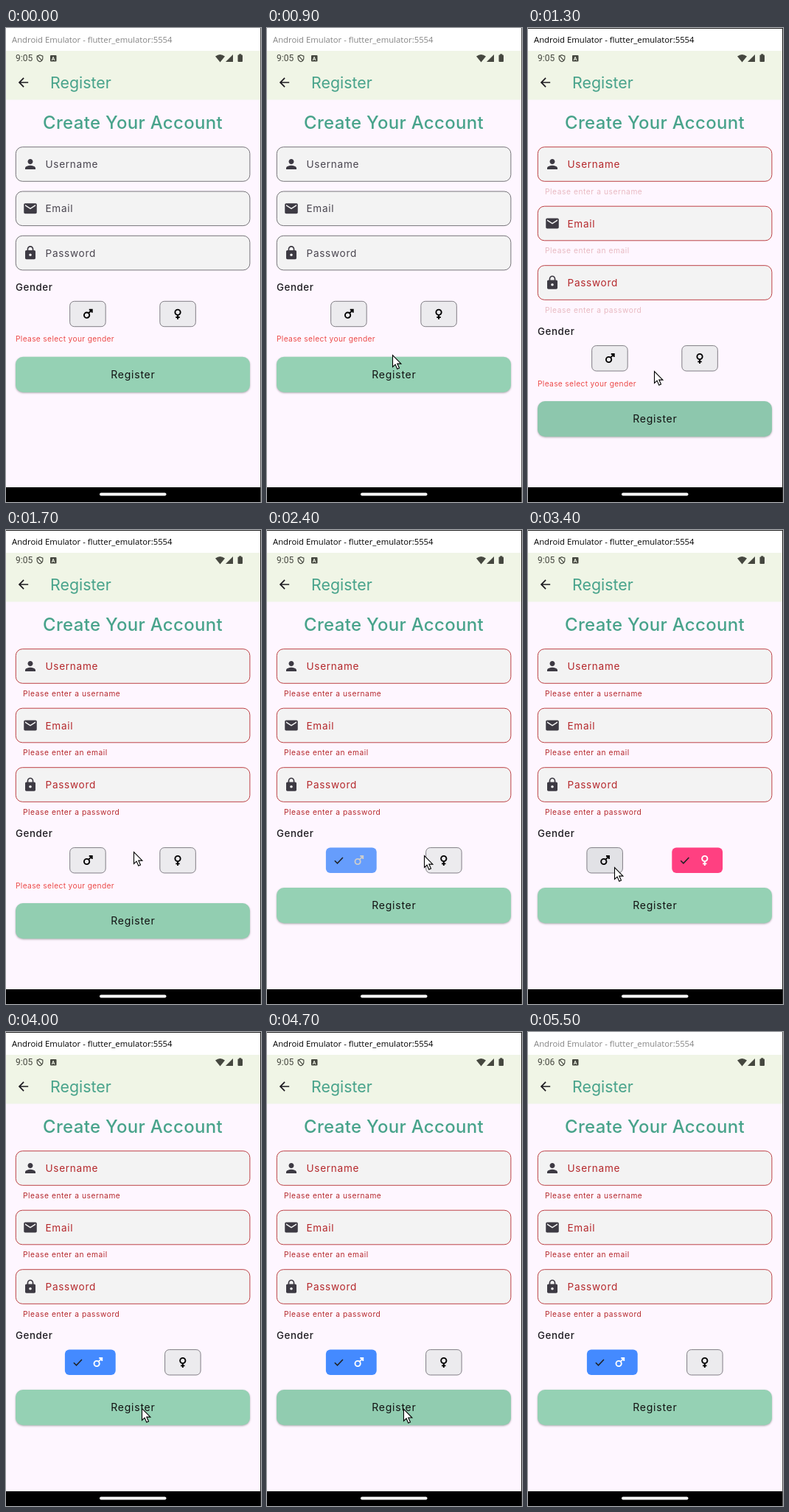
Recreate the animation shown at these times as an HTML page with a canvas. Size 346 by 644 pixels, loop 5600 ms.

```html
<!DOCTYPE html>
<html lang="en">
<head>
<meta charset="utf-8">
<title>Register form</title>
<style>
html, body { margin: 0; width: 100%; height: 100%; overflow: hidden; }
canvas { display: block; }
</style>
</head>
<body>
<canvas id="stage" width="346" height="644"></canvas>
<script>
const ctx = document.getElementById('stage').getContext('2d');
const LOOP = 5600, STEP = 100;
const SUBMIT = 1200, ERRORS = 1300, PICK_MALE = 2200, PICK_FEMALE = 2700,
  REPICK_MALE = 3500, RESUBMIT = 4300, CLOCK = 5000, BLUR = 5500;
const INK = '#1d1b20', GREEN = '#48a38b', RED = '#b5282c';

// Pointer tip: time, x, y
const POINTER = [
  [400, 262, 646], [600, 205, 530], [900, 170, 444], [1100, 171, 464], [1300, 171, 466],
  [1700, 173, 437], [2000, 112, 448], [2200, 114, 448], [2400, 213, 442], [2600, 238, 449],
  [3000, 236, 450], [3400, 117, 458], [3600, 114, 455], [4000, 184, 511],
  [4800, 185, 512], [5200, 216, 646]
];

const ICONS = {
  person: 'M12 12c2.21 0 4-1.79 4-4s-1.79-4-4-4-4 1.79-4 4 1.79 4 4 4zm0 2c-2.67 0-8 1.34-8 4v2h16v-2c0-2.66-5.33-4-8-4z',
  mail: 'M20 4H4c-1.1 0-2 .9-2 2v12c0 1.1.9 2 2 2h16c1.1 0 2-.9 2-2V6c0-1.1-.9-2-2-2zm0 4l-8 5-8-5V6l8 5 8-5v2z',
  lock: 'M18 8h-1V6c0-2.76-2.24-5-5-5S7 3.24 7 6v2H6c-1.1 0-2 .9-2 2v10c0 1.1.9 2 2 2h12c1.1 0 2-.9 2-2V10c0-1.1-.9-2-2-2zm-6 9c-1.1 0-2-.9-2-2s.9-2 2-2 2 .9 2 2-.9 2-2 2zm3.1-9H8.9V6c0-1.71 1.39-3.1 3.1-3.1s3.1 1.39 3.1 3.1v2z',
  back: 'M20 11H7.83l5.59-5.59L12 4l-8 8 8 8 1.41-1.41L7.83 13H20z',
  male: 'M14 10L19 5M14.4 4.6H19.4V9.6M15 14a4.6 4.6 0 1 1-9.2 0a4.6 4.6 0 1 1 9.2 0',
  female: 'M12 13.6V21M8.6 17.6H15.4M16.6 9a4.6 4.6 0 1 1-9.2 0a4.6 4.6 0 1 1 9.2 0',
  check: 'M5 12.5L9.6 17L19 7.2',
  shield: 'M12 3L20 6V12C20 17 16 20.500 12 22C8 20.500 4 17 4 12V6ZM5 5L18 19',
  arrow: 'M0 0V16L3.600 12.600L6.300 18.700L9 17.500L6.300 11.600H11.400Z'
};

const FIELDS = [
  ['Username', 'person', 'Please enter a username'],
  ['Email', 'mail', 'Please enter an email'],
  ['Password', 'lock', 'Please enter a password']
];

const ramp = (t, start, length) => Math.min(1, Math.max(0, (t - start) / length));
const mix = (a, b, k) => a + (b - a) * k;
const mixColor = (a, b, k) => `rgb(${a.map((v, i) => Math.round(mix(v, b[i], k)))})`;

function text(str, x, y, size, color, { spacing = 0, weight = 400, font = 'Inter', align = 'left' } = {}) {
  ctx.font = `${weight} ${size}px "${font}", sans-serif`;
  ctx.letterSpacing = spacing + 'px';
  ctx.textAlign = align;
  ctx.fillStyle = color;
  ctx.fillText(str, x, y);
}

function rect(x, y, w, h, color) {
  ctx.fillStyle = color;
  ctx.fillRect(x, y, w, h);
}

function box(x, y, w, h, radius, fill, stroke) {
  ctx.beginPath();
  ctx.roundRect(x, y, w, h, radius);
  ctx.fillStyle = fill;
  ctx.fill();
  if (stroke) {
    ctx.lineWidth = 1;
    ctx.strokeStyle = stroke;
    ctx.stroke();
  }
}

function polygon(color, ...points) {
  ctx.beginPath();
  points.forEach(([x, y]) => ctx.lineTo(x, y));
  ctx.fillStyle = color;
  ctx.fill();
}

// Icons sit on a 24-unit grid centred at (x, y); a line width draws them as outlines.
function icon(name, x, y, size, color, lineWidth) {
  const path = new Path2D(ICONS[name]);
  ctx.save();
  ctx.translate(x - size / 2, y - size / 2);
  ctx.scale(size / 24, size / 24);
  ctx.fillStyle = ctx.strokeStyle = color;
  if (lineWidth) {
    ctx.lineWidth = lineWidth;
    ctx.stroke(path);
  } else ctx.fill(path);
  ctx.restore();
}

function pointerAt(t) {
  const i = POINTER.findIndex(key => key[0] > t);
  if (i < 1) return [-50, -50];
  const [a, b] = [POINTER[i - 1], POINTER[i]];
  const u = ramp(t, a[0], b[0] - a[0]), k = u * u * (3 - 2 * u);
  return [mix(a[1], b[1], k), mix(a[2], b[2], k)];
}

function drawFrame(t) {
  const focused = t >= SUBMIT && t < BLUR;
  rect(0, 0, 346, 644, '#fef6ff');
  rect(0, 0, 346, 31, '#fff');
  text('Android Emulator - flutter_emulator:5554', 8, 20, 11.3, focused ? '#000' : '#858585', { font: 'Open Sans' });

  rect(0, 31, 346, 66.5, '#f0f5e6');
  text(t < CLOCK ? '9:05' : '9:06', 13, 45, 12, '#45473f', { font: 'Roboto' });
  icon('shield', 46, 41, 11.5, '#45473f', 2.4);
  box(60, 37, 8.5, 8.5, 1, '#45473f');
  text('A', 64.2, 44, 7, '#f0f5e6', { weight: 700, font: 'Roboto', align: 'center' });
  ctx.beginPath();
  ctx.moveTo(290.5, 46.5);
  ctx.lineTo(284, 38.5);
  ctx.quadraticCurveTo(290.5, 33.5, 297, 38.5);
  ctx.fillStyle = '#45473f';
  ctx.fill();
  polygon('#45473f', [298, 46], [308, 46], [308, 36]);
  box(314.5, 36.5, 6.5, 9.5, 1, '#45473f');
  rect(316.2, 35.3, 3, 2, '#45473f');

  icon('back', 23.5, 74, 20, INK);
  text('Register', 60, 82, 21.4, GREEN);
  text('Create Your Account', 172, 136.5, 24, GREEN, { weight: 500, spacing: 0.3, align: 'center' });
  drawForm(t);

  rect(0, 624, 346, 20, '#000');
  box(127, 631.5, 90.5, 4, 2, '#fff');
  rect(345, 0, 1, 644, focused ? '#222' : '#555');
  if (focused) rect(0, 0, 346, 1, '#222');

  const [x, y] = pointerAt(t);
  ctx.save();
  ctx.translate(x + 0.5, y + 0.5);
  const arrow = new Path2D(ICONS.arrow);
  ctx.fillStyle = '#fff';
  ctx.fill(arrow);
  ctx.strokeStyle = '#000';
  ctx.lineWidth = 1.1;
  ctx.stroke(arrow);
  ctx.restore();
}

function drawForm(t) {
  const invalid = t >= ERRORS;
  const pitch = invalid ? 80.5 : 60.3;
  FIELDS.forEach(([label, glyph, error], i) => {
    const y = 161.7 + i * pitch;
    box(13.3, y, 317.6, 46.6, 9, '#f3f3f3', invalid ? '#bd4246' : '#77757a');
    icon(glyph, 33, y + 23.3, 21, '#3d3a43');
    text(label, 53.5, y + 28.3, 13.6, invalid ? RED : '#49454f', { spacing: 0.7 });
    if (invalid) {
      ctx.globalAlpha = ramp(t, ERRORS - 50, 170);
      text(error, 23, y + 64, 10.2, RED, { spacing: 0.57 });
      ctx.globalAlpha = 1;
    }
  });

  const shift = invalid ? 60.3 : 0;
  text('Gender', 13, 356.7 + shift, 13.3, INK, { weight: 500, spacing: 0.6 });
  drawChips(t, 371.3 + shift);

  const chosen = t >= PICK_MALE;
  if (!chosen) text('Please select your gender', 13, 426.3 + shift, 10.2, '#ec4a48', { spacing: 0.35 });

  const top = 446.7 + shift - (chosen ? 21 : 0);
  ctx.save();
  ctx.shadowColor = 'rgba(0,0,0,.3)';
  ctx.shadowBlur = 2.5;
  ctx.shadowOffsetY = 1;
  box(13, top, 318, 48.3, 10, '#95d1b4');
  ctx.restore();
  const press = Math.max(...[SUBMIT, RESUBMIT].map(at => t < at ? 0 : 1 - ramp(t, at, 700)));
  if (press) box(13, top, 318, 48.3, 10, `rgba(60,100,90,${0.1 * press})`);
  text('Register', 172.4, top + 28.8, 14, '#111', { spacing: 0.75, align: 'center' });
}

function drawChips(t, y) {
  const selection = length => {
    const swap = ramp(t, PICK_FEMALE, length), back = ramp(t, REPICK_MALE, length);
    return [ramp(t, PICK_MALE, length) - swap + back, swap - back];
  };
  const grow = selection(150), tint = selection(250);
  const widths = grow.map(g => 48.5 + 20.3 * g);
  const gap = (318 - widths[0] - widths[1]) / 3;
  const [px, py] = pointerAt(t);
  let x = 13 + gap;

  ['male', 'female'].forEach((name, i) => {
    const w = widths[i], k = tint[i];
    const hover = px > x && px < x + w && py > y && py < y + 35;
    const base = hover ? [226, 226, 230] : [236, 235, 238];
    const accent = i ? [255, 64, 129] : [68, 138, 255];
    box(x, y, w, 34.4, 6, mixColor(base, accent, k), k < 0.5 ? '#817e85' : null);
    if (grow[i] > 0) {
      ctx.globalAlpha = grow[i];
      icon('check', x + 17.5, y + 17.3, 19, '#202124', 1.9);
      ctx.globalAlpha = 1;
    }
    icon(name, x + 24.2 + 20.3 * grow[i], y + 17.3, 19, mixColor([0, 0, 0], [255, 255, 255], k), 2.4);
    x += w + gap;
  });
}

function tick(now) {
  drawFrame(Math.floor(now % LOOP / STEP) * STEP);
  requestAnimationFrame(tick);
}
requestAnimationFrame(tick);
</script>
</body>
</html>
```
